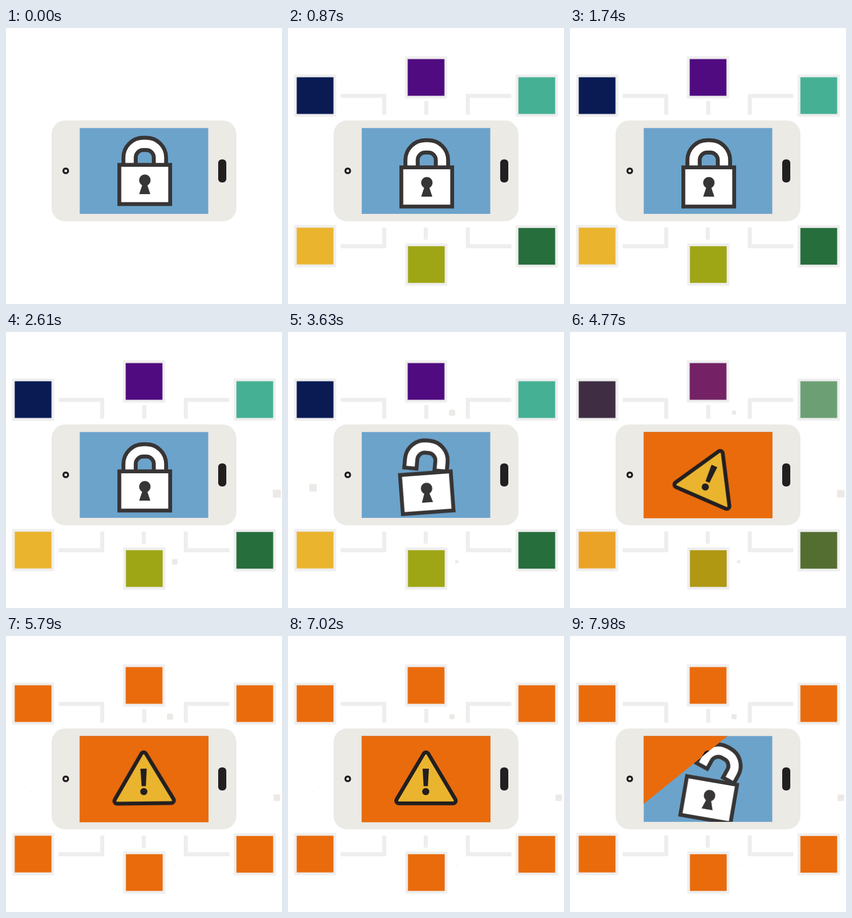
An HTML page for the animation above (8 s loop, 545x545 px).

```html
<!DOCTYPE html>
<html lang="en">
<head>
<meta charset="utf-8">
<title>Phone security alert</title>
<style>
  html, body { margin: 0; width: 100%; height: 100%; overflow: hidden; background: #fff; }
  svg { display: block; width: 100vw; height: 100vh; }

  .links { fill: none; stroke: #eee; stroke-width: 8; stroke-dasharray: 1 2; }
  .links path { animation: draw 8s linear infinite; }
  @keyframes draw {
    0% { stroke-dashoffset: 1.02; animation-timing-function: ease-out; }
    5%, 100% { stroke-dashoffset: 0; }
  }

  .tile { animation: pop 8s linear infinite; }
  .frame { fill: #efefef; }
  @keyframes pop {
    0%, 1% { transform: scale(0); animation-timing-function: ease-out; }
    7.5% { transform: scale(1.04); animation-timing-function: ease-in-out; }
    10%, 100% { transform: scale(1); }
  }
  .face { animation: alarm 8s linear infinite; }
  @keyframes alarm {
    0%, 53.75% { fill: var(--c); animation-timing-function: ease-in-out; }
    71.25%, 100% { fill: #e96b0c; }
  }

  .lock { transform-origin: 274px 313.5px; animation: lock 8s linear infinite; }
  @keyframes lock {
    0% { transform: translateY(-5px) rotate(0deg); animation-timing-function: ease-out; }
    4%, 41.5% { transform: translateY(0) rotate(0deg); animation-timing-function: ease-in-out; }
    45.375% { transform: translateY(3.5px) rotate(-4.2deg); animation-timing-function: ease-in-out; }
    49%, 100% { transform: translateY(9.5px) rotate(9.8deg); }
  }
  .shackle { transform-origin: 304px 275px; animation: unlock 8s linear infinite; }
  @keyframes unlock {
    0%, 41.5% { transform: rotate(0deg) translateY(0); }
    45.375% { transform: rotate(9.6deg) translateY(-6px); }
    49%, 100% { transform: rotate(19deg) translateY(-9.5px); }
  }

  .wipe { transform-origin: 145.3px 197.2px; animation: wipe 8s linear infinite; }
  @keyframes wipe {
    0%, 50% { transform: scale(0); }
    55.4%, 96.25% { transform: scale(1); }
    99.75% { transform: scale(.353); }
    100% { transform: scale(.307); }
  }
  .sign { transform-origin: 272.5px 295px; animation: swing 8s ease-in-out infinite; }
  @keyframes swing {
    0%, 53% { transform: rotate(0deg); }
    56.25% { transform: rotate(-23.5deg); }
    59.625% { transform: rotate(23.5deg); }
    63% { transform: rotate(-15deg); }
    66.5% { transform: rotate(8deg); }
    70% { transform: rotate(-3deg); }
    73.5%, 100% { transform: rotate(0deg); }
  }

  .dots rect {
    transform-box: fill-box;
    transform-origin: center;
    animation: var(--pulse) 8s ease-in-out infinite;
  }
  @keyframes pulse-right {
    0%, 21.5% { transform: scale(0); }
    25%, 32.6% { transform: scale(1); }
    42%, 45.5% { transform: scale(0); }
    51% { transform: scale(.88); }
    59.6% { transform: scale(.94); }
    66% { transform: scale(1); }
    74% { transform: scale(.81); }
    81% { transform: scale(1); }
    87.75% { transform: scale(.81); }
    93.75% { transform: scale(1); }
    99.75%, 100% { transform: scale(.81); }
  }
  @keyframes pulse-bottom {
    0%, 27.5% { transform: scale(0); }
    32.6% { transform: scale(.69); }
    45.4%, 59.6% { transform: scale(.38); }
    74% { transform: scale(.12); }
    81% { transform: scale(.35); }
    87.75% { transform: scale(.12); }
    93.75% { transform: scale(.35); }
    99.75%, 100% { transform: scale(.12); }
  }
  @keyframes pulse-left {
    0%, 40.5% { transform: scale(0); }
    45.4% { transform: scale(.94); }
    59.6% { transform: scale(0); }
    74% { transform: scale(.12); }
    81% { transform: scale(.4); }
    87.75% { transform: scale(.12); }
    93.75% { transform: scale(.4); }
    99.75%, 100% { transform: scale(.12); }
  }
  @keyframes pulse-top {
    0%, 36% { transform: scale(0); }
    40%, 45.4% { transform: scale(.75); }
    59.6% { transform: scale(.5); }
    72% { transform: scale(.75); }
    87.75% { transform: scale(.63); }
    93.75% { transform: scale(.75); }
    99.75%, 100% { transform: scale(.63); }
  }
</style>
</head>
<body>
<svg viewBox="0 0 545 545">
  <defs>
    <clipPath id="screen"><rect x="145.6" y="197.5" width="253.8" height="169.5"/></clipPath>
    <clipPath id="wipe"><path class="wipe" d="M145.3 197.2h474l-474 384z"/></clipPath>
  </defs>

  <g class="links">
    <path pathLength="1" d="M190 171V134H104"/>
    <path pathLength="1" d="M355 171V134H441"/>
    <path pathLength="1" d="M190 394V431H104"/>
    <path pathLength="1" d="M355 394V431H441"/>
    <path pathLength="1" d="M273 171V144"/>
    <path pathLength="1" d="M272 394V418"/>
  </g>

  <g transform="translate(53.5 133.5)" style="--c:#0a1b54"><g class="tile">
    <path class="frame" d="M-41.7-41.7h83.4v83.4h-83.4z"/><path class="face" d="M-36.3-36.3h72.6v72.6h-72.6z"/>
  </g></g>
  <g transform="translate(272.6 97.6)" style="--c:#500b80"><g class="tile">
    <path class="frame" d="M-41.7-41.7h83.4v83.4h-83.4z"/><path class="face" d="M-36.3-36.3h72.6v72.6h-72.6z"/>
  </g></g>
  <g transform="translate(491.2 133.5)" style="--c:#45b094"><g class="tile">
    <path class="frame" d="M-41.7-41.7h83.4v83.4h-83.4z"/><path class="face" d="M-36.3-36.3h72.6v72.6h-72.6z"/>
  </g></g>
  <g transform="translate(53.5 430.6)" style="--c:#eab42e"><g class="tile">
    <path class="frame" d="M-41.7-41.7h83.4v83.4h-83.4z"/><path class="face" d="M-36.3-36.3h72.6v72.6h-72.6z"/>
  </g></g>
  <g transform="translate(273.1 467.1)" style="--c:#9fa615"><g class="tile">
    <path class="frame" d="M-41.7-41.7h83.4v83.4h-83.4z"/><path class="face" d="M-36.3-36.3h72.6v72.6h-72.6z"/>
  </g></g>
  <g transform="translate(491.2 431.1)" style="--c:#266e3c"><g class="tile">
    <path class="frame" d="M-41.7-41.7h83.4v83.4h-83.4z"/><path class="face" d="M-36.3-36.3h72.6v72.6h-72.6z"/>
  </g></g>

  <g class="dots" fill="#ebeae6">
    <rect style="--pulse:pulse-right" x="526.8" y="311.3" width="16" height="16" rx="2"/>
    <rect style="--pulse:pulse-bottom" x="325.3" y="445.7" width="16" height="16" rx="2"/>
    <rect style="--pulse:pulse-left" x="41.3" y="299.7" width="16" height="16" rx="2"/>
    <rect style="--pulse:pulse-top" x="316" y="151.2" width="16" height="16" rx="3"/>
  </g>

  <rect x="90" y="182.5" width="365" height="199.3" rx="27" fill="#ebeae5"/>
  <circle cx="118" cy="282" r="4.6" fill="#fff" stroke="#231f20" stroke-width="4"/>
  <rect x="419" y="259.5" width="16" height="45.5" rx="7" fill="#231f20"/>

  <g clip-path="url(#screen)">
    <rect x="145" y="197" width="255" height="171" fill="#6ca3cb"/>
    <g class="lock">
      <g class="shackle" fill="none">
        <path d="M244 282V260a27 27 0 0 1 27-27h6a27 27 0 0 1 27 27V282" transform="translate(0 .8)" stroke="#373535" stroke-width="32"/>
        <path d="M244 274.5V260a27 27 0 0 1 27-27h6a27 27 0 0 1 27 27V274.5" transform="translate(0 .8)" stroke="#fff" stroke-width="16.6"/>
      </g>
      <rect x="223.8" y="275.2" width="100.4" height="77.4" fill="#fff" stroke="#373535" stroke-width="7.6"/>
      <path d="M270 312h8l7 21h-22z" fill="#373535"/>
      <circle cx="274.2" cy="305.5" r="11.2" fill="#373535"/>
    </g>
  </g>

  <g clip-path="url(#wipe)">
    <rect x="145.3" y="197.2" width="254.5" height="170.6" fill="#e96b0c"/>
    <g class="sign" fill="#231f20" stroke-linejoin="round">
      <path d="M272.5 235L219 325.2H326z" stroke="#231f20" stroke-width="18"/>
      <path d="M272.5 235L219 325.2H326z" fill="#eab42e" stroke="#eab42e" stroke-width="3"/>
      <path d="M265.8 262h12.4l-2 34.5h-8.4z"/>
      <circle cx="272" cy="307.3" r="7"/>
    </g>
  </g>
</svg>
</body>
</html>
```
